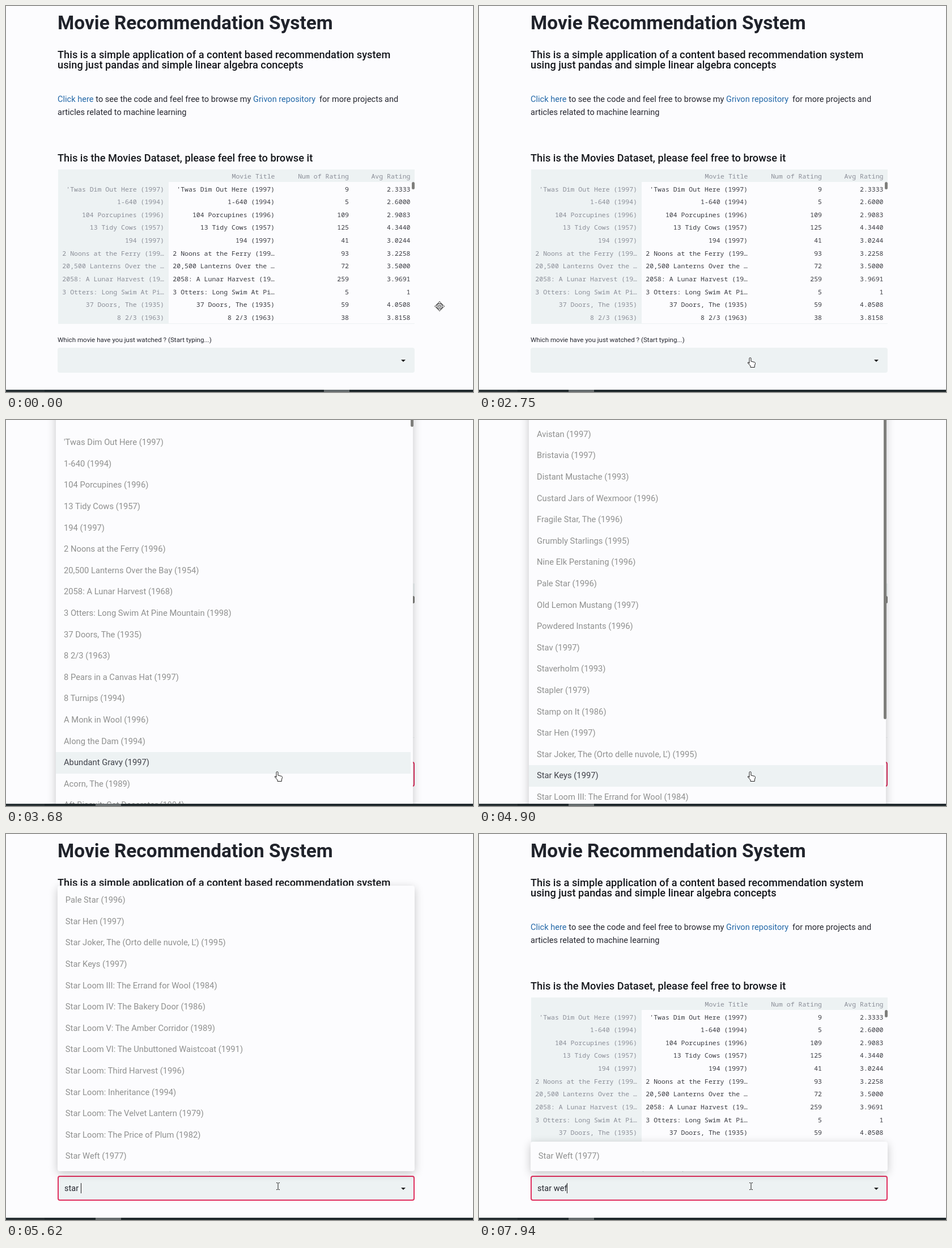
An HTML page for the animation above (7990 ms loop, 824 by 680 pixels).

```html
<!DOCTYPE html>
<html lang="en">
<head>
<meta charset="utf-8">
<title>Movie Recommendation System</title>
<style>
html, body { margin: 0; width: 100%; height: 100%; overflow: hidden; background: #fcfcfe; }
#scene { position: relative; width: 824px; height: 680px; overflow: hidden; background: #fcfcfe;
  color: #262730; font: 14.57px Roboto, sans-serif; }
#scene div, #scene svg { position: absolute; }
.text { line-height: 24px; white-space: pre; }
.title { font-size: 33.4px; font-weight: 700; color: #20232b; }
.head { font-size: 18.25px; font-weight: 500; color: #15171c; }
.link { color: #2368a8; }
.label { font-size: 11.64px; }
.cell { font: 11.52px/24px "Noto Sans Mono", monospace; color: #3a3b42; }
.faint { color: #8b8e98; }
.shade { background: #edf2f3; }
#input { left: 91px; top: 602px; width: 630px; height: 44px; border-radius: 4px; box-sizing: border-box;
  background: #edf2f3; border: 2px solid transparent; }
#input.focus { border-color: #e0305f; }
#typed { left: 10px; top: 11px; height: 18px; line-height: 18px; white-space: pre; border-right: 1px solid #222; }
#arrow { left: 604px; top: 19px; border: 4px solid transparent; border-top-color: #222; border-bottom: 0; }
#panel { width: 630px; border-radius: 4px; background: #fcfcfe; box-shadow: 0 4px 16px rgba(0, 0, 0, .22); }
.row { left: 0; width: 612px; padding-left: 14px; height: 37.6px; font-size: 14.75px; line-height: 37.6px;
  white-space: pre; color: #8f908f; }
.row.hover { background: #edf2f3; color: #40424a; }
.thumb { width: 5.5px; border-radius: 3px; background: #7e7e7b; }
#bar { left: 0; top: 675.5px; width: 824px; height: 5px; background: linear-gradient(90deg, #293134 68px, #20292c 68px); }
.tab { top: 0; width: 45px; height: 5px; background: #656b6d; }
#cursor { left: 0; top: 0; }
</style>
</head>
<body>
<div id="scene">
  <div id="page"></div>
  <div id="input"><div id="typed"></div><div id="arrow"></div></div>
  <div id="panel"></div>
  <svg id="cursor" width="824" height="680" fill="#fff" stroke="#222" stroke-linejoin="round">
    <g id="pan">
      <path d="M0-8.5l3.5 4h-7zM0 8.5l3.5-4h-7zM-8.5 0l4-3.5v7zM8.5 0l-4-3.5v7z"/>
      <path d="M-4.5-4.5l9 9M4.5-4.5l-9 9" stroke-width=".8"/><circle r="2"/>
    </g>
    <path id="pointer" d="M0 0v15l3.5-3.2 2.5 5.5 2.4-1.1-2.5-5.3h4.7z"/>
    <path id="hand" d="M-1 2a1.5 1.5 0 0 1 3 0v5l6.3 1.5q1.5.6 1.2 2.2l-1.2 4.3v2.5H1V15l-4.6-5q-.3-2 1.6-1L-1 10.5z"/>
    <path id="beam" fill="none" d="M-3-6h2l1 1 1-1h2M0-5V5M-3 6h2l1-1 1 1h2"/>
  </svg>
  <div id="bar"><div class="tab" style="left:561px"></div><div class="tab" style="left:158px"></div></div>
</div>
<script>
const LOOP = 7990, ROW = 37.6, PAD = 7.2, PANEL_BOTTOM = 594.2;
const $ = id => document.getElementById(id);

const movies = [
  "'Twas Dim Out Here (1997)", "1-640 (1994)", "104 Porcupines (1996)", "13 Tidy Cows (1957)", "194 (1997)",
  "2 Noons at the Ferry (1996)", "20,500 Lanterns Over the Bay (1954)", "2058: A Lunar Harvest (1968)",
  "3 Otters: Long Swim At Pine Mountain (1998)", "37 Doors, The (1935)", "8 2/3 (1963)",
  "8 Pears in a Canvas Hat (1997)", "8 Turnips (1994)", "A Monk in Wool (1996)", "Along the Dam (1994)",
  "Abundant Gravy (1997)", "Acorn, The (1989)", "Aft Biscuit: Cat Decorator (1994)",
  "Avistan (1997)", "Bristavia (1997)", "Distant Mustache (1993)", "Custard Jars of Wexmoor (1996)",
  "Fragile Star, The (1996)", "Grumbly Starlings (1995)", "Nine Elk Perstaning (1996)", "Pale Star (1996)",
  "Old Lemon Mustang (1997)", "Powdered Instants (1996)", "Stav (1997)", "Staverholm (1993)", "Stapler (1979)",
  "Stamp on It (1986)", "Star Hen (1997)", "Star Joker, The (Orto delle nuvole, L') (1995)", "Star Keys (1997)",
  "Star Loom III: The Errand for Wool (1984)", "Star Loom IV: The Bakery Door (1986)",
  "Star Loom V: The Amber Corridor (1989)", "Star Loom VI: The Unbuttoned Waistcoat (1991)",
  "Star Loom: Third Harvest (1996)", "Star Loom: Inheritance (1994)", "Star Loom: The Velvet Lantern (1979)",
  "Star Loom: The Price of Plum (1982)", "Star Weft (1977)"
];
const counts = [9, 5, 109, 125, 41, 93, 72, 259, 5, 59, 38];
const ratings = "2.3333 2.6000 2.9083 4.3440 3.0244 3.2258 3.5000 3.9691 1 4.0508 3.8158".split(" ");

function add(parent, className, style, text = "") {
  const el = document.createElement("div");
  el.className = className;
  el.textContent = text;
  for (const key in style) el.style[key] = style[key] + "px";
  return parent.appendChild(el);
}
const page = $("page");
// y is the middle of the capitals
const write = (text, x, y, cls = "") => add(page, "text " + cls, { left: x, top: y - 12 }, text);
const cell = (text, right, y, cls = "") =>
  add(page, "text cell " + cls, { left: right - 300, width: 300, top: y - 12 }, text).style.textAlign = "right";
const box = (cls, left, top, width, height) => add(page, cls, { left, top, width, height });

function buildPage() {
  write("Movie Recommendation System", 91, 29.5, "title");
  write("This is a simple application of a content based recommendation system", 91, 86, "head");
  write("using just pandas and simple linear algebra concepts", 91, 104, "head");
  write("Click here", 91, 163.5, "link");
  write("to see the code and feel free to browse my", 158.3, 163.5);
  write("Grivon repository", 436, 163.5, "link");
  write("for more projects and", 553, 163.5);
  write("articles related to machine learning", 91, 186.9);
  write("This is the Movies Dataset, please feel free to browse it", 91, 267.5, "head");
  write("Which movie have you just watched ? (Start typing...)", 91, 587.5, "label");

  box("shade", 92, 288, 629, 22);
  box("shade", 92, 310, 195, 249);
  box("shade", 92, 559, 629, 1);
  cell("Movie Title", 474.5, 300, "faint");
  cell("Num of Rating", 605, 300, "faint");
  cell("Avg Rating", 713.5, 300, "faint");
  counts.forEach((count, i) => {
    const y = 322.6 + 22.62 * i, name = movies[i];
    const short = name.length > 26 ? name.slice(0, 25) + "…" : name;
    cell(short, 279, y, "faint");
    cell(short, 474, y);
    cell(count, 605, y);
    cell(ratings[i], 713.5, y);
  });
  box("thumb", 715.5, 310, 5.5, 13);
}

// full: list taller than the screen; otherwise the panel sits on the input unless top is set
const steps = [
  { at: 2790, query: "", full: true, first: 21.2, thumb: 12, hover: 15 },
  { at: 4610, query: "s", full: true, first: 6.7, thumb: 30, hover: 16 },
  { at: 4740, query: "st", full: true, first: 6.7, thumb: 120, hover: 16 },
  { at: 4860, query: "sta", full: true, first: 6.7, thumb: 527, hover: 16 },
  { at: 5050, query: "star" },
  { at: 5290, query: "star " },
  { at: 6250, query: "star w", top: 91 },
  { at: 6870, query: "star w" },
  { at: 7100, query: "star we" },
  { at: 7450, query: "star wef" }
];

function showStep(step) {
  const panel = $("panel");
  panel.textContent = "";
  panel.style.display = step ? "" : "none";
  $("input").className = step ? "focus" : "";
  $("typed").style.display = step ? "" : "none";
  if (!step) return;
  $("typed").textContent = step.query;
  const found = movies.filter(name => name.toLowerCase().includes(step.query)).slice(0, 19);
  const height = step.full ? 740 : found.length * ROW + 2 * PAD;
  const top = step.full ? -20 : step.top ?? PANEL_BOTTOM - height;
  const first = step.full ? step.first - top : PAD;
  panel.style.left = (step.full ? 88 : 90.8) + "px";
  panel.style.top = top + "px";
  panel.style.height = height + "px";
  found.forEach((name, i) => add(panel, i === step.hover ? "row hover" : "row", { top: first + ROW * i }, name));
  if (step.full) add(panel, "thumb", { left: 625.5, top: 18, height: step.thumb + 2 });
}

const path = [[130, 765, 529], [250, 806, 655], [430, 420, 400], [600, 78, 210], [760, 300, 24],
  [890, 445, 40], [1020, 505, 330], [1180, 478, 619]];
function cursorAt(t) {
  const next = path.findIndex(p => p[0] > t);
  if (next <= 0) return (next ? path[path.length - 1] : path[0]).slice(1);
  const [a, b] = [path[next - 1], path[next]];
  const k = (t - a[0]) / (b[0] - a[0]);
  return [a[1] + (b[1] - a[1]) * k, a[2] + (b[2] - a[2]) * k];
}

function drawCursor(t) {
  let [x, y] = cursorAt(t);
  const inInput = y > 602 && y < 646 && x > 91 && x < 721;
  const kind = t < 130 ? "pan" : t >= 5050 ? "beam" : inInput ? "hand" : "pointer";
  if (kind === "beam") [x, y] = [480, 620.5];
  for (const id of ["pan", "pointer", "hand", "beam"]) $(id).style.display = id === kind ? "" : "none";
  $(kind).setAttribute("transform", `translate(${x} ${y})`);
}

const clamp = v => Math.min(1, Math.max(0, v));
const tabs = document.querySelectorAll(".tab");
let shown = null;
function draw(now) {
  const t = now % LOOP;
  const step = steps.filter(s => s.at <= t).pop() || null;
  if (step !== shown) showStep(shown = step);
  $("panel").style.opacity = clamp((t - 2790) / 120);
  const swap = clamp((t - 1740) / 120);
  tabs[0].style.opacity = 1 - swap;
  tabs[1].style.opacity = swap;
  drawCursor(t);
}

buildPage();
showStep(null);
const start = performance.now();
function tick() {
  draw(performance.now() - start);
  requestAnimationFrame(tick);
}
tick();
</script>
</body>
</html>
```
